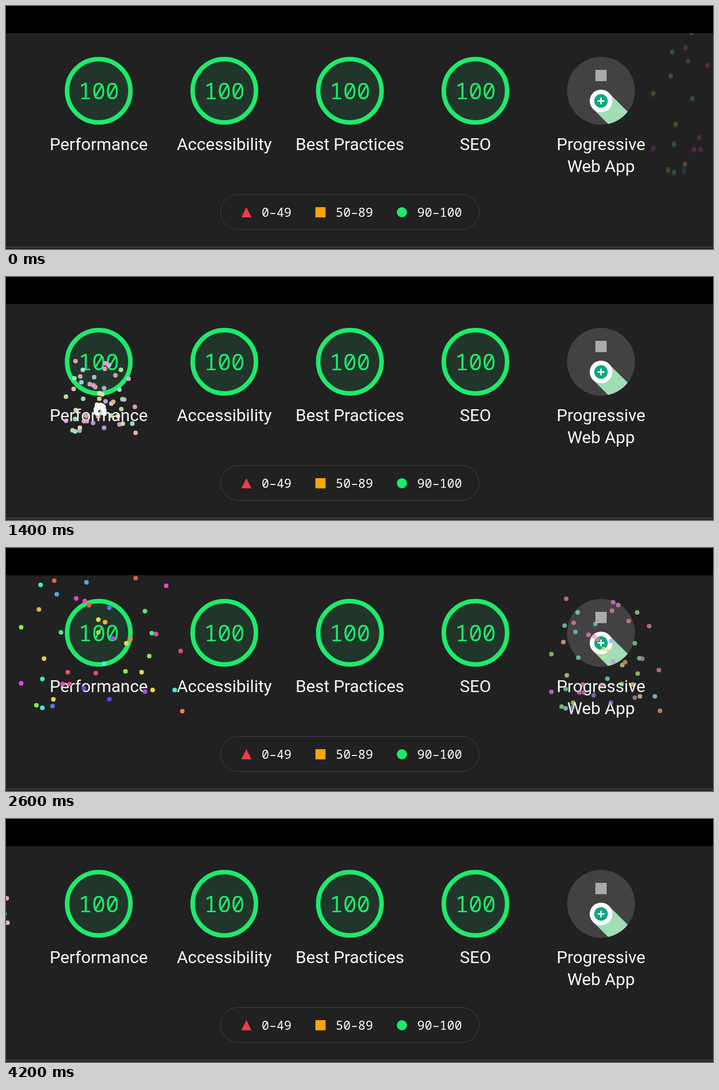
An HTML page that plays this animation: 1250x430 px, repeating every 4400 ms.

```html
<!DOCTYPE html>
<html lang="en">
<head>
<meta charset="utf-8">
<title>Audit scores</title>
<style>
  html, body { margin: 0; width: 100%; height: 100%; overflow: hidden; background: #212121; }
  svg { position: absolute; left: 0; top: 0; }
  .sky { position: absolute; left: 0; top: 48px; width: 1250px; height: 382px; overflow: hidden; }
  .spark { position: absolute; left: 0; top: 0; width: 7.5px; height: 7.5px; border-radius: 50%; }
  .label { font: 30px Roboto, sans-serif; fill: #fafafa; text-anchor: middle; }
  .score { font: 40px "Noto Sans Mono", monospace; fill: #1eea6b; text-anchor: middle; }
  .range { font: 22px "Noto Sans Mono", monospace; fill: #fff; }
</style>
</head>
<body>
<svg width="1250" height="430" viewBox="0 0 1250 430">
  <rect width="1250" height="48" fill="#000"/>
  <rect y="426" width="1250" height="1.5" fill="#4a464a"/>
  <g id="gauges"></g>

  <clipPath id="disc"><circle cx="1052" cy="150" r="60"/></clipPath>
  <circle cx="1052" cy="150" r="60" fill="#424242"/>
  <rect x="1042" y="113" width="20" height="20" fill="#aaa"/>
  <path d="M1066.1 153.9l60 60l-28.2 28.2l-60 -60z" fill="#a1ddb5" clip-path="url(#disc)"/>
  <circle cx="1052" cy="168" r="20" fill="#fff"/>
  <circle cx="1052" cy="168" r="12" fill="#0fa781"/>
  <path d="M1046 168h12M1052 162v12" stroke="#fff" stroke-width="2.4"/>
  <text class="label" x="1052" y="255">Progressive</text>
  <text class="label" x="1052" y="294">Web App</text>

  <rect x="379.5" y="333.5" width="457" height="62" rx="31" fill="none" stroke="#424242"/>
  <path d="M416 374h18l-9 -18z" fill="#f23b45"/>
  <rect x="547" y="356" width="18" height="18" fill="#ffa400"/>
  <circle cx="700" cy="365" r="9" fill="#1eea6b"/>
  <text class="range" x="452" y="373">0–49</text>
  <text class="range" x="583" y="373">50–89</text>
  <text class="range" x="727" y="373">90–100</text>
</svg>
<div class="sky"><div class="spark"></div><div class="spark"></div></div>

<script>
const LOOP = 4400, STEP = 200, START = 100, LAG = 10, ZOOM = 1.5;

// Spark positions by hue
const sparks = {
  7: [[42,-124], [-38,-13], [-13,-92], [-67,-163], [-54,-121]],
  21: [[36,-52], [97,33]],
  38: [[-72,-87], [6,-72]],
  54: [[-2,-75], [62,8], [-66,-29], [31,-47], [-55,19], [49,-13]],
  97: [[58,-32], [57,-139], [-93,-66], [30,-14], [-2,-60], [-75,26]],
  140: [[53,-85], [-46,-60], [61,-59]],
  161: [[-70,-116], [-47,-139], [-68,-5]],
  179: [[5,-23], [-68,29], [88,8]],
  202: [[-51,-105], [-16,-119]],
  221: [[-56,27], [11,-89]],
  250: [[-19,6], [11,19]],
  278: [[15,-53], [53,10]],
  298: [[-93,0], [-44,1], [24,-152]],
  319: [[-28,-100], [13,-142], [66,-58], [78,-115], [15,-157], [-18,-97]],
  335: [[-36,1], [-5,-12], [95,-38]]
};

// Burst places, left and top in percent of the page width
const places = [[47, 4], [30, 7], [70, 6], [20, 3], [80, 3]];
const bursts = [...document.querySelectorAll(".spark")];
const periods = [1000, 1250];

["Performance", "Accessibility", "Best Practices", "SEO"].forEach((name, i) => {
  const x = 164 + 222 * i;
  document.getElementById("gauges").innerHTML += `
    <circle cx="${x}" cy="150" r="56" fill="#21352a" stroke="#1eea6b" stroke-width="8"/>
    <text class="score" x="${x}" y="165">100</text>
    <text class="label" x="${x}" y="255">${name}</text>`;
});

// cubic-bezier(.42, 0, 1, 1)
function easeIn(x) {
  let lo = 0, hi = 1;
  for (let i = 0; i < 24; i++) {
    const s = (lo + hi) / 2, r = 1 - s;
    if (1.26 * r * r * s + 3 * r * s * s + s ** 3 < x) lo = s; else hi = s;
  }
  return 3 * (1 - lo) * lo * lo + lo ** 3;
}
const easeOut = x => 1 - easeIn(1 - x);
const fraction = x => x - Math.floor(x);

function drawBurst(el, period, time) {
  // The spread trails the fall a little, which shows when a cycle restarts
  const cycle = (time - START - LAG) / period;
  const spread = easeOut(fraction(cycle));
  const fall = easeIn(fraction((time - START) / period));
  const [left, top] = places[(Math.floor(cycle) + 5) % 5];
  const x = 166 + 22.3 * (left - 30);
  const y = 82.3 + 22.3 * top + 120 * fall - 48;
  const scale = ZOOM * spread;

  el.style.transform = `translate(${x - 3.75}px, ${y - 3.75}px)`;
  el.style.opacity = 1 - fall;
  el.style.boxShadow = Object.entries(sparks).flatMap(([hue, points]) => points.map(([dx, dy]) =>
    `${dx * scale}px ${(dy + 0.33) * scale}px hsl(${hue}, 80%, ${100 - 40 * spread}%)`)).join();
}

function frame() {
  const time = Math.floor(performance.now() % LOOP / STEP) * STEP;
  bursts.forEach((el, i) => drawBurst(el, periods[i], time));
  requestAnimationFrame(frame);
}
frame();
</script>
</body>
</html>
```
